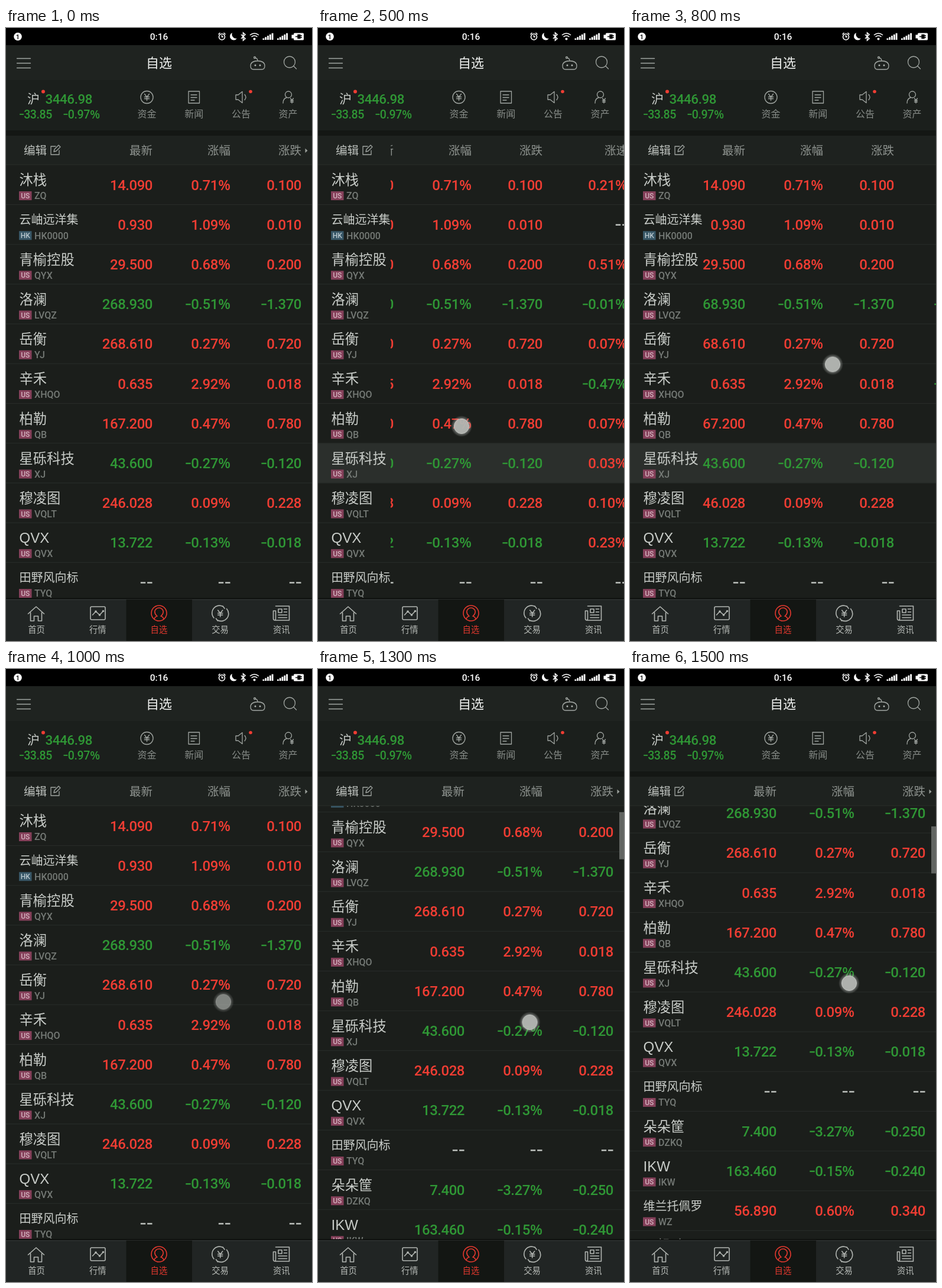
Animation, 518 px wide and 1036 px high, one loop 1.6 s. Source, as an HTML page:

```html
<!DOCTYPE html>
<html lang="zh-CN">
<head>
<meta charset="utf-8">
<title>自选</title>
<style>
html, body { margin: 0; width: 100%; height: 100%; overflow: hidden; background: #1b1e1b; }
svg { display: block; width: 100vw; height: 100vh; }
text { font-family: "Noto Sans CJK SC", "Noto Sans CJK", sans-serif; }
.num { font-family: Roboto, sans-serif; font-weight: 500; }
.digits { letter-spacing: -.02em; }
.pct { font-family: "Open Sans", sans-serif; font-weight: 600; }
.latin { font-family: "Liberation Sans", sans-serif; }
.line { fill: none; stroke: #a1a6a2; stroke-width: 1.3; stroke-linecap: round; stroke-linejoin: round; }
.tab .line { stroke: #b2b6b2; stroke-width: 1.6; }
.tab .on { stroke: #e5392f; }
</style>
</head>
<body>
<svg id="stage" viewBox="0 0 518 1036" xmlns="http://www.w3.org/2000/svg"></svg>
<script>
const RED = '#f03d33', GREEN = '#2f9735', PLAIN = '#c4c8c4';
const ROW = 67.2, TOP = 231.4;
const COLS = [248, 380, 500, 644];

// name, code, price, change %, change, speed
const rows = [
  '沐栈 ZQ 14.090 0.71% 0.100 0.21%',
  '云岫远洋集 HK0000 0.930 1.09% 0.010 --',
  '青榆控股 QYX 29.500 0.68% 0.200 0.51%',
  '洛澜 LVQZ 268.930 -0.51% -1.370 -0.01%',
  '岳衡 YJ 268.610 0.27% 0.720 0.07%',
  '辛禾 XHQO 0.635 2.92% 0.018 -0.47%',
  '柏勒 QB 167.200 0.47% 0.780 0.07%',
  '星砾科技 XJ 43.600 -0.27% -0.120 0.03%',
  '穆凌图 VQLT 246.028 0.09% 0.228 0.10%',
  'QVX QVX 13.722 -0.13% -0.018 0.23%',
  '田野风向标 TYQ -- -- -- --',
  '朵朵筐 DZKQ 7.400 -3.27% -0.250 --',
  'IKW IKW 163.460 -0.15% -0.240 --',
  '维兰托佩罗 WZ 56.890 0.60% 0.340 --',
  '远帆晴野 YFQ -- -- -- --'
].map(r => r.split(' '));

const rect = (x, y, w, h, fill, more = '') =>
  `<rect x="${x}" y="${y}" width="${w}" height="${h}" fill="${fill}" ${more}/>`;
const text = (s, x, y, size, fill, more = '') =>
  `<text x="${x}" y="${y}" font-size="${size}" fill="${fill}" ${more}>${s}</text>`;
const path = (d, more = 'class="line"') => `<path d="${d}" ${more}/>`;
const circle = (x, y, r, more = 'class="line"') => `<circle cx="${x}" cy="${y}" r="${r}" ${more}/>`;
const MID = 'text-anchor="middle"', END = 'text-anchor="end"';

const colorOf = s => s === '--' ? PLAIN : s[0] === '-' ? GREEN : RED;

// Right-aligned figure centred on cy, with a wide dash and percent sign
function figure(s, right, cy, size, fill) {
  const dash = x => rect(x, cy - size * .03, size * .35, size * .1, fill);
  if (s === '--') return dash(right - size * .84) + dash(right - size * .37);
  const pct = s.endsWith('%'), neg = s[0] === '-';
  const digits = s.replace(/[-%]/g, ''), base = cy + size * .36;
  const x = right - (pct ? size * .88 : 0);
  const wide = (digits.length - 1) * size * .5415 + size * .25;
  return text(digits, x, base, size, fill, `class="num digits" ${END}`)
    + (pct ? text('%', right, base, size, fill, `class="pct" ${END}`) : '')
    + (neg ? dash(x - wide - size * .4) : '');
}

function label(r, i) {
  const [name, code] = r, cy = 265 + i * ROW;
  const latin = /^[A-Z]/.test(name), hk = code.startsWith('HK');
  const size = latin ? 24 : name.length > 4 ? 20 : 23.3;
  return rect(0, TOP + (i + 1) * ROW - .7, 518, 1.2, '#272b28')
    + text(name, 22.5, cy - 8.3 + size * (latin ? .36 : .375), size, '#c9cdc9', latin ? 'class="latin"' : '')
    + rect(22, cy + 11, 21.5, 15, hk ? '#385767' : '#85405a')
    + text(hk ? 'HK' : 'US', 32.7, cy + 23, 12, hk ? '#bccad0' : '#d5b4c0', `class="num" ${MID}`)
    + text(code, 48, cy + 24.3, 16, '#757a76', 'class="num"');
}

// The price takes the colour of its change
function values(r, i) {
  const [price, ...rest] = r.slice(2);
  return [price, ...rest].map((v, k) =>
    figure(v, COLS[k], 265 + i * ROW, 24, colorOf(k ? v : rest[1]))).join('');
}

const yen = (x, y) => path(`M${x - 4} ${y - 5}l4 5l4 -5M${x} ${y}v6M${x - 4} ${y}h8M${x - 4} ${y + 3}h8`);

function signal(x) {
  let s = '';
  for (let i = 0; i < 5; i++) s += rect(x + i * 3.8, 17.5 - i * 2.2, 2.8, 2.5 + i * 2.2, '#fff');
  return s;
}

function statusBar() {
  const thin = 'fill="none" stroke="#fff" stroke-width="1.6"';
  return rect(0, 0, 518, 29, '#000')
    + circle(20, 14.5, 6.8, 'fill="#fff"') + text('1', 20, 18.6, 11, '#000', `class="num" ${MID}`)
    + text('0:16', 259, 20, 15.5, '#fff', `class="num" ${MID}`)
    + circle(365.5, 15, 5, thin) + path('M365.5 12v3h2.5M359.5 11l3 -3M371.5 11l-3 -3', thin)
    + path('M383 8A6.5 6.5 0 1 0 391 17.5A7 7 0 0 1 383 8z', 'fill="#fff"')
    + path('M398 11l7 7l-3.5 3v-13l3.5 3l-7 7', thin)
    + path('M413 12q7.5 -6 15 0M415.5 15q5 -4 10 0', thin) + circle(420.5, 18.5, 2, 'fill="#fff"')
    + signal(434.5) + signal(459)
    + rect(487, 8.5, 17, 12, '#fff', 'rx="1.5"') + rect(483.5, 11.5, 4, 6, '#fff')
    + path('M490 14.5h4M494 11.5h4v6h-4zM498 13h3M498 16h3', 'stroke="#000" stroke-width="1.3"');
}

function titleBar() {
  const eye = 'fill="#b0b5b1"';
  return rect(0, 29, 518, 59, '#1f2320')
    + path('M18.5 51.5h23M18.5 59.5h23M18.5 67.5h23')
    + text('自选', 259, 67, 22, '#f0f2f0', `font-weight="500" ${MID}`)
    + path('M419 70q-5 0 -5 -6q0 -8 12 -8.5q12 .5 12 8.5q0 6 -5 6zM426 55.5q0 -4 -4 -5')
    + circle(421, 50, 1.5) + circle(422, 63, 1.5, eye) + circle(430, 63, 1.5, eye)
    + circle(480, 57.5, 9.5) + path('M487 64.5l4.5 4.5');
}

function summary() {
  const names = ['资金', '新闻', '公告', '资产'];
  const dot = `fill="${RED}"`;
  return rect(0, 88, 518, 85, '#1b1f1c') + rect(0, 173, 518, 9, '#141714')
    + text('沪', 36, 126.5, 21, '#c8ccc8') + circle(63, 107.5, 3, dot)
    + figure('3446.98', 146, 120, 22.4, GREEN)
    + figure('-33.85', 78, 145.5, 19.5, GREEN) + figure('-0.97%', 159, 145.5, 19.5, GREEN)
    + names.map((s, i) => text(s, 238.5 + i * 79.7, 151.3, 16, '#878c88', MID)).join('')
    + circle(238.5, 117, 10.5) + yen(238.5, 116.5)
    + path('M309 107h18.5v20h-18.5zM313 113h10M313 117.5h10M313 122h6')
    + path('M389 113h4l7 -5.5v19l-7 -5.5h-4zM404 112.5q4 4.5 0 9') + circle(414, 107.5, 2.8, dot)
    + circle(478, 112.5, 5.5) + path('M469 127q0 -8 6.5 -9.5')
    + path('M481.5 119l2.5 3l2.5 -3M484 122v5M481.5 122.5h5M481.5 125h5');
}

function listHead() {
  const heads = ['最新', '涨幅', '涨跌', '涨速'];
  return rect(0, 182, 518, 49, '#1e221f')
    + text('编辑', 30, 214.3, 19.6, '#bcc0bc')
    + path('M84 200h-8v14h14v-7M81 209l1 -4l7 -7l3 3l-7 7z')
    + '<g clip-path="url(#right)"><g class="sideways">'
    + heads.map((s, i) => text(s, COLS[i], 214.3, 19.5, '#8d928e', END)).join('')
    + '</g></g>' + path('M506.5 203.5l4 3.7l-4 3.7z', 'id="arrow" fill="#9ba09c"')
    + rect(0, 230.5, 518, 1, '#2a2e2b');
}

function tabs() {
  const names = ['首页', '行情', '自选', '交易', '资讯'];
  const on = 'class="line on"';
  return rect(0, 963.5, 518, 2, '#0b0d0b') + rect(0, 965.5, 518, 71, '#212524')
    + rect(0, 965.5, 518, 1, '#383c3a') + rect(203.5, 966, 111.5, 70, '#131613')
    + names.map((s, i) =>
      text(s, 51.5 + i * 103.7, 1022.3, 14.3, i === 2 ? '#e5392f' : '#b8bcb8', MID)).join('')
    + '<g class="tab">'
    + path('M37.5 990l13.5 -12l13.5 12M41.5 988v14h6v-8h7v8h6v-14')
    + path('M145 978h21q2 0 2 2v18q0 2 -2 2h-21q-2 0 -2 -2v-18q0 -2 2 -2zM146.5 992l5.5 -6l6.5 6l6.5 -7')
    + [[152, 986], [158.5, 992], [164.5, 985.5]].map(([x, y]) => circle(x, y, 1.8, 'fill="#b2b6b2"')).join('')
    + circle(259, 989, 13, on)
    + path('M251 999q1 -4 5 -5q-5 -4 -4 -9q2 -5 7 -5t7 5q1 5 -4 9q4 1 5 5', on)
    + path('M352 997a12.5 12.5 0 0 1 15 -19.5M373.5 981.5a12.5 12.5 0 0 1 -15 19.5M367 977l3 4M358.5 1002l-3 -4')
    + yen(362.7, 989)
    + path('M456.5 977h23v24h-24q-3 0 -3 -3v-13h4M456.5 985v13q0 3 -2 3M461 982h6v6h-6z')
    + path('M470.5 982h5M470.5 987h5M461 992h14.5M461 996.5h14.5')
    + '</g>';
}

const stage = document.getElementById('stage');
stage.innerHTML = `<defs>
  <clipPath id="list"><rect x="0" y="231.5" width="518" height="733"/></clipPath>
  <clipPath id="right"><rect x="123" y="180" width="395" height="1200"/></clipPath>
  <radialGradient id="halo">
    <stop offset=".7" stop-color="#c8cbc8" stop-opacity=".45"/>
    <stop offset="1" stop-color="#c8cbc8" stop-opacity="0"/>
  </radialGradient>
</defs>`
  + rect(0, 0, 518, 1036, '#1b1e1b')
  + '<g clip-path="url(#list)"><g id="scroll">'
  + rect(0, TOP + 7 * ROW, 518, ROW, '#2b2f2c', 'id="press"')
  + rows.map(label).join('')
  + `<g clip-path="url(#right)"><g class="sideways">${rows.map(values).join('')}</g></g></g>`
  + rect(510, 212, 8, 79.5, '#626562', 'id="bar"') + '</g>'
  + statusBar() + titleBar() + summary() + listHead() + tabs()
  + '<g id="touch">' + circle(0, 0, 18, 'fill="url(#halo)"')
  + circle(0, 0, 12.5, 'fill="#b4b7b3" fill-opacity=".93" stroke="#c4c7c3"') + '</g>';

// Per 100 ms: side scroll, list scroll, touch x, touch y, touch opacity, row pressed
const still = [0, 0, 369, 764, 0, 0];
const steps = [
  still, still, still,
  [0, 0, 369, 764, 1, 0],
  [54, 0, 311, 720, 1, 1],
  [120, 0, 243, 673, 1, 1],
  [140, 0, 228, 628, 1, 1],
  [104, 0, 286, 590, 1, 1],
  [53, 0, 343, 568.5, 1, 1],
  [12, 0, 366, 562.5, 1, 1],
  [0, 0, 368, 562.5, .7, 0],
  still,
  [0, 22, 352, 695, 1, 0],
  [0, 124, 358.5, 597, 1, 0],
  [0, 178, 366, 560, 1, 0],
  [0, 223, 371, 531, 1, 0]
];

function play(selector, pose) {
  const frames = steps.map((s, i) => ({ ...pose(s), offset: i / steps.length, easing: 'step-end' }));
  frames.push({ ...pose(steps.at(-1)), offset: 1 });
  for (const el of stage.querySelectorAll(selector))
    el.animate(frames, { duration: steps.length * 100, iterations: Infinity });
}
const move = (x, y) => `translate(${x}px, ${y}px)`;

play('.sideways', ([sx]) => ({ transform: move(-sx, 0) }));
play('#scroll', ([, sy]) => ({ transform: move(0, -sy) }));
play('#bar', ([, sy]) => ({ transform: move(0, sy * .242), opacity: sy ? 1 : 0 }));
play('#touch', ([, , x, y, o]) => ({ transform: move(x, y), opacity: o }));
play('#press', s => ({ opacity: s[5] }));
play('#arrow', ([sx]) => ({ opacity: sx ? 0 : 1 }));
</script>
</body>
</html>
```
